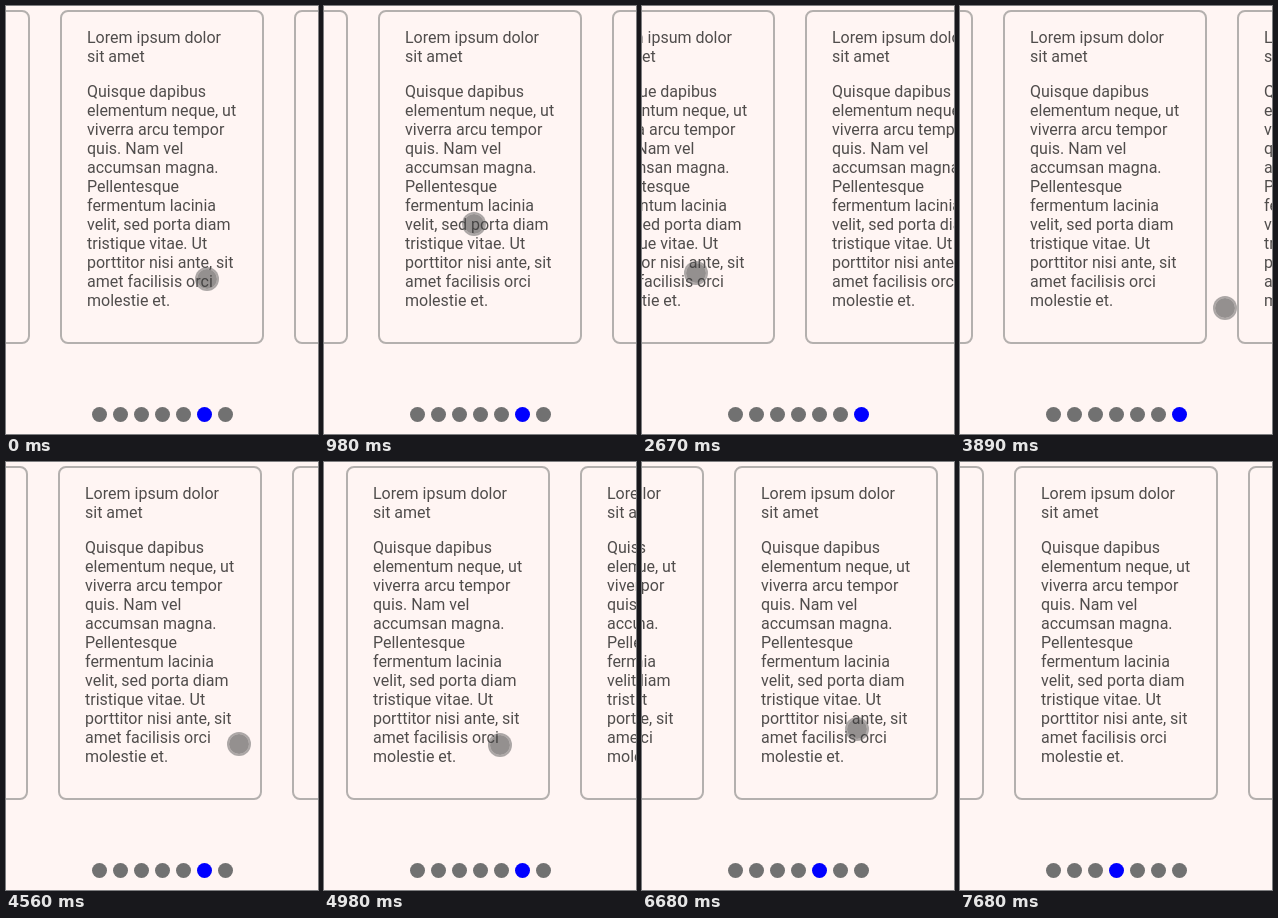
An HTML page for the animation above (8220 ms loop, 312x428 px).

```html
<!DOCTYPE html>
<html lang="en">
<head>
<meta charset="utf-8">
<title>Swipe carousel</title>
<style>
  html, body { margin: 0; width: 100%; height: 100%; overflow: hidden; background: #fff5f3; }
  body { position: relative; font: 16px/19px Roboto, sans-serif; color: #504d4c; }
  .card {
    position: absolute; left: 0; top: 4px; width: 204px; height: 334px;
    box-sizing: border-box; padding: 16px 25px;
    border: 2px solid #b4b0ae; border-radius: 8px; white-space: pre;
  }
  .card p { margin: 0 0 16px; }
  .dot { position: absolute; top: 401px; width: 15px; height: 15px; border-radius: 50%; background: #717171; }
  .dot.active { background: #00f; }
  .touch {
    position: absolute; left: -12px; top: -12px; width: 24px; height: 24px;
    box-sizing: border-box; border-radius: 50%; background-clip: padding-box;
    border: 2px solid rgba(90, 90, 90, .5); background-color: rgba(60, 60, 60, .55);
  }
  .touch.down { border-color: rgba(190, 188, 40, .75); background-color: rgba(180, 178, 20, .8); }
</style>
</head>
<body>
<script>
const LOOP = 8220, PITCH = 234;
const TRAVEL = 250, GRIP = 50, SETTLE = 300, REST = 130; // ms
const SLOP = 4, ARC = -0.04;
const HEADING = 'Lorem ipsum dolor\nsit amet';
const TEXT = `Quisque dapibus
elementum neque, ut
viverra arcu tempor
quis. Nam vel
accumsan magna.
Pellentesque
fermentum lacinia
velit, sed porta diam
tristique vitae. Ut
porttitor nisi ante, sit
amet facilisis orci
molestie et.`;

// The finger presses at (x, y), drags by dx and lets go; the last one leaves the stage.
const swipes = [
  { press: 100, release: 600, x: 213, y: 215, dx: -63 },
  { press: 1330, release: 1600, x: 120, y: 240, dx: 70 },
  { press: 1940, release: 2670, x: 183, y: 262, dx: -129 },
  { press: 3290, release: 3770, x: 300, y: 301, dx: -35 },
  { press: 4080, release: 4300, x: 120, y: 290, dx: 130 },
  { press: 4650, release: 4940, x: 223, y: 281, dx: -47 },
  { press: 5400, release: 5660, x: 156, y: 296, dx: 134 },
  { press: 6240, release: 6600, x: 140, y: 270, dx: 75 },
  { press: 7010, release: 7300, x: 110, y: 270, dx: 130 },
  { press: 7660, release: LOOP, x: 250, y: 450, dx: 0 }
];

const add = (className, html = '') => {
  const el = document.createElement('div');
  el.className = className;
  el.innerHTML = html;
  return document.body.appendChild(el);
};
const cards = Array.from({ length: 3 }, () => add('card', `<p>${HEADING}</p><p>${TEXT}</p>`));
const dots = Array.from({ length: 7 }, (_, i) => {
  const dot = add('dot');
  dot.style.left = 86 + 21 * i + 'px';
  return dot;
});
const touch = add('touch');

const mix = (a, b, k) => a + (b - a) * k;
const progress = (t, a, b) => Math.min(1, Math.max(0, (t - a) / (b - a)));
const smooth = k => k * k * (3 - 2 * k);
const easeOut = k => 1 - (1 - k) ** 2;
const place = (el, x, y) => el.style.transform = `translate(${Math.round(x)}px, ${Math.round(y)}px)`;

// Cards follow the finger past a small slop.
const pullOf = dx => Math.sign(dx) * Math.max(Math.abs(dx) - SLOP, 0);
// A drag past half a card turns the page, a shorter one springs back.
const goalOf = dx => Math.abs(pullOf(dx)) > PITCH / 2 ? Math.sign(dx) * PITCH : 0;

function stateAt(t) {
  let x = 201, y = 273, shift = 0, down = false, free = 20;
  for (const s of swipes) {
    const travel = smooth(progress(t, Math.max(free, s.press - TRAVEL), s.press));
    const moved = s.dx * progress(t, s.press + GRIP, s.release);
    const settle = easeOut(progress(t, s.release, s.release + SETTLE));
    x = mix(x, s.x, travel) + moved;
    y = mix(y, s.y, travel) + moved * ARC;
    shift += mix(pullOf(moved), goalOf(s.dx), settle);
    down ||= t >= s.press && t < s.release;
    free = s.release + REST;
  }
  return { x, y, shift, down };
}

function draw(t) {
  const { x, y, shift, down } = stateAt(t);
  const left = (54 + shift + PITCH * dots.length) % PITCH;
  const active = 5 - Math.round(shift / PITCH);
  cards.forEach((card, i) => place(card, left + (i - 1) * PITCH, 0));
  dots.forEach((dot, i) => dot.classList.toggle('active', i === active));
  touch.classList.toggle('down', down);
  place(touch, x, y);
}

let origin;
function tick(now) {
  origin ??= now;
  draw((now - origin) % LOOP);
  requestAnimationFrame(tick);
}
draw(0);
requestAnimationFrame(tick);
</script>
</body>
</html>
```
